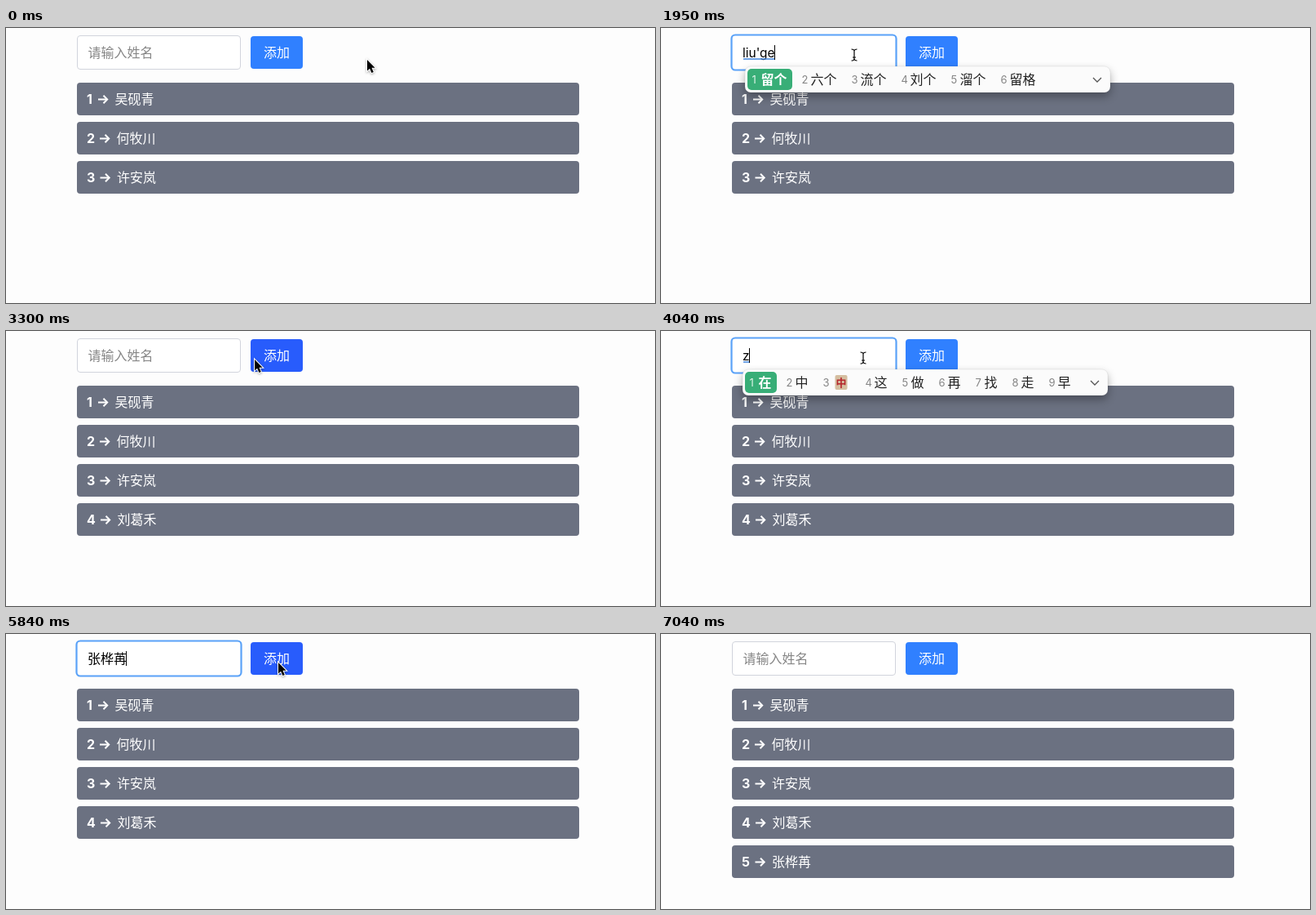
Write an HTML page with a canvas that moves like this. It is 796 px wide and 337 px high and loops after 7.34 s.

```html
<!DOCTYPE html>
<html lang="zh-CN">
<head>
<meta charset="utf-8">
<style>
  html, body { margin: 0; width: 100%; height: 100%; overflow: hidden; background: #fdfdfd; }
  canvas { display: block; }
</style>
</head>
<body>
<canvas width="796" height="337"></canvas>
<script>
const LOOP = 7340;
const ctx = document.querySelector('canvas').getContext('2d');
const FAMILY = 'Inter, "Noto Sans CJK SC", "Noto Sans CJK", sans-serif';
const names = ['吴砚青', '何牧川', '许安岚', '刘葛禾', '张桦苒'];
const nameX = [133.5, 135.5, 136, 136.5, 136];

const move = (x, y, hover = false) => ({ x, y, hover, beam: false });
const beam = (x, y) => ({ x, y, hover: false, beam: true });
const type = (text, words) => ({ text, words: words.split(' '), composing: true, caret: true });
const commit = text => ({ text, composing: false });
const focus = { focused: true, caret: true };
const add = count => ({ count, text: '', focused: false, caret: false });

// Each step changes part of the state and holds until the next one.
const steps = [
  [0, { ...move(443, 39), ...add(3), popupX: 103 }],
  [150, move(418, 38)],
  [300, move(345, 35, true)],
  [450, beam(265, 33)],
  [600, beam(237, 33)],
  [750, focus],
  [1200, type('l', '了 来 里 两 啦 老 拉 路 乐')],
  [1350, type('li', '里 力 离 李 立 利 理 礼 例')],
  [1650, type('liu', '留 六 流 刘 溜 柳 遛 榴 瘤')],
  [1800, type("liu'g", '六个 留给 流过 六国 流感 溜')],
  [1950, type("liu'ge", '留个 六个 流个 刘个 溜个 留格')],
  [2100, type("liu'ge'h", '六个号 留个 六个 流个 刘 留')],
  [2250, type("liu'ge'he", '刘葛禾 六个 留个 流个 刘 留')],
  [2400, commit('刘葛禾')],
  [2850, { ...move(325, 47), caret: false }],
  [3000, move(333, 37, true)],
  [3150, { ...move(333, 37, true), ...add(4) }],
  [3300, move(305, 35, true)],
  [3450, beam(256, 33)],
  [3600, { ...beam(248, 33), ...focus, popupX: 100 }],
  [4040, type('z', '在 中 🀄 这 做 再 找 走 早')],
  [4190, type('zh', '这 中 🀄 只 找 真 张 着 装')],
  [4340, type('zhan', '站 占 战 展 沾 粘 盏 斩 瞻')],
  [4490, type('zhang', '张 长 章 账 掌 涨 丈 胀 帐')],
  [4640, type("zhang'h", '账号 长号 张 长 章 账 掌')],
  [4790, type("zhang'hu", '账户 掌护 张 长 章 账 掌')],
  [4940, type("zhang'hua", '掌画 张桦 张花 章 张 账 长')],
  [5090, type("zhang'hua'r", '张桦苒 张桦 掌画 张花 章 张 账')],
  [5390, commit('张桦苒')],
  [5540, beam(262, 34)],
  [5690, move(310, 36)],
  [5840, move(334, 35, true)],
  [5990, add(5)],
  [6140, move(385, 36)],
  [6290, move(453, 37)],
  [6590, move(545, 110)],
  [6740, move(635, 205)],
  [6890, move(711, 280)],
  [7040, { x: -50 }],
];

function stateAt(time) {
  return Object.assign({}, ...steps.filter(([start]) => start <= time).map(step => step[1]));
}

function box(x, y, w, h, r, fill) {
  ctx.beginPath();
  ctx.roundRect(x, y, w, h, r);
  ctx.fillStyle = fill;
  ctx.fill();
}

function border(color, width) {
  ctx.strokeStyle = color;
  ctx.lineWidth = width;
  ctx.stroke();
}

function label(text, x, y, color, weight = 400, size = 16) {
  ctx.font = `${weight} ${size}px ${FAMILY}`;
  ctx.fillStyle = color;
  ctx.fillText(text, x, y);
}

function line(points, color, width) {
  ctx.beginPath();
  points.forEach(p => ctx.lineTo(...p));
  border(color, width);
}

function shadow(color, blur, y) {
  ctx.shadowColor = color;
  ctx.shadowBlur = blur;
  ctx.shadowOffsetY = y;
}

function drawList(count) {
  names.slice(0, count).forEach((name, i) => {
    const y = 67 + i * 48, mid = y + 20.5, tip = nameX[i] - 9;
    box(87, y, 616, 40, 4, '#6b7181');
    label(i + 1, 99, y + 26, '#fff', 700);
    line([[tip - 11.5, mid], [tip - 0.5, mid]], '#fff', 2);
    line([[tip - 5, mid - 4.7], [tip - 0.3, mid], [tip - 5, mid + 4.7]], '#fff', 2);
    label(name, nameX[i], y + 26, '#fff', 500);
  });
}

function drawInput({ focused, text, composing, caret }) {
  if (focused) {
    box(86.5, 8.5, 202, 43, 4.5, '#fff');
    border('#5aa2f8', 2.2);
  } else {
    box(87.5, 9.5, 200, 41, 3.5, '#fff');
    border('#d1d4dc', 1);
  }
  const size = composing ? 15.5 : 16;
  label(text || '请输入姓名', text ? 100 : 100.5, 36, text ? '#000' : '#868686', 400, size);
  const end = 100 + (text ? ctx.measureText(text).width : 0);
  if (composing) line([[101, 38], [end - 0.5, 38]], '#3f83dc', 1.5);
  if (caret) line([[Math.round(end) - 0.5, 21], [Math.round(end) - 0.5, 39]], '#000', 1);
}

function drawPopup(x, words) {
  shadow('rgba(0,0,0,.32)', 11, 5);
  box(x, 47, 448, 32, 7, '#fbfbfb');
  shadow('transparent', 0, 0);
  border('rgba(0,0,0,.1)', 0.6);
  let left = x + 8.5;
  words.forEach((word, i) => {
    const chosen = i === 0, tile = word === '🀄';
    if (chosen) box(x + 3, 50, word.length * 16 + 23, 26, 5, '#38ae77');
    label(i + 1, left, 68, chosen ? '#e2f5ea' : '#858585', 400, 13);
    if (tile) {
      box(left + 15, 54, 15, 18, 2, '#d5bea0');
      label('中', left + 16, 68, '#b5272d', 700, 13);
    } else {
      label(word, left + 11, 69, chosen ? '#fff' : '#222', chosen ? 600 : 400);
    }
    left += tile ? 52 : word.length * 16 + 29;
  });
  line([[x + 427, 61], [x + 432, 66], [x + 437, 61]], '#555', 1.3);
}

function drawPointer({ x, y, beam }) {
  ctx.save();
  ctx.translate(x, y);
  if (beam) {
    const shape = new Path2D('M-3.5-7Q0-7 0-4.5Q0-7 3.5-7M0-5V5M-3.5 7Q0 7 0 4.5Q0 7 3.5 7M-2 3H2');
    for (const [color, width] of [['#fff', 3], ['#000', 1.2]]) {
      ctx.strokeStyle = color;
      ctx.lineWidth = width;
      ctx.stroke(shape);
    }
  } else {
    const shape = new Path2D('M0 0V13.5L3.1 10.7L5.4 16L7.8 15L5.5 9.8H9.6Z');
    shadow('rgba(0,0,0,.35)', 3, 1);
    ctx.strokeStyle = '#fff';
    ctx.lineWidth = 2;
    ctx.stroke(shape);
    shadow('transparent', 0, 0);
    ctx.fillStyle = '#000';
    ctx.fill(shape);
  }
  ctx.restore();
}

function draw() {
  const state = stateAt(performance.now() % LOOP);
  ctx.fillStyle = '#fdfdfd';
  ctx.fillRect(0, 0, 796, 337);
  drawList(state.count);
  drawInput(state);
  box(300, 10, 64, 40, 4, state.hover ? '#285cfc' : '#3080ff');
  label('添加', 316, 36, '#fff', 500);
  if (state.composing) drawPopup(state.popupX, state.words);
  drawPointer(state);
  requestAnimationFrame(draw);
}
draw();
</script>
</body>
</html>
```
